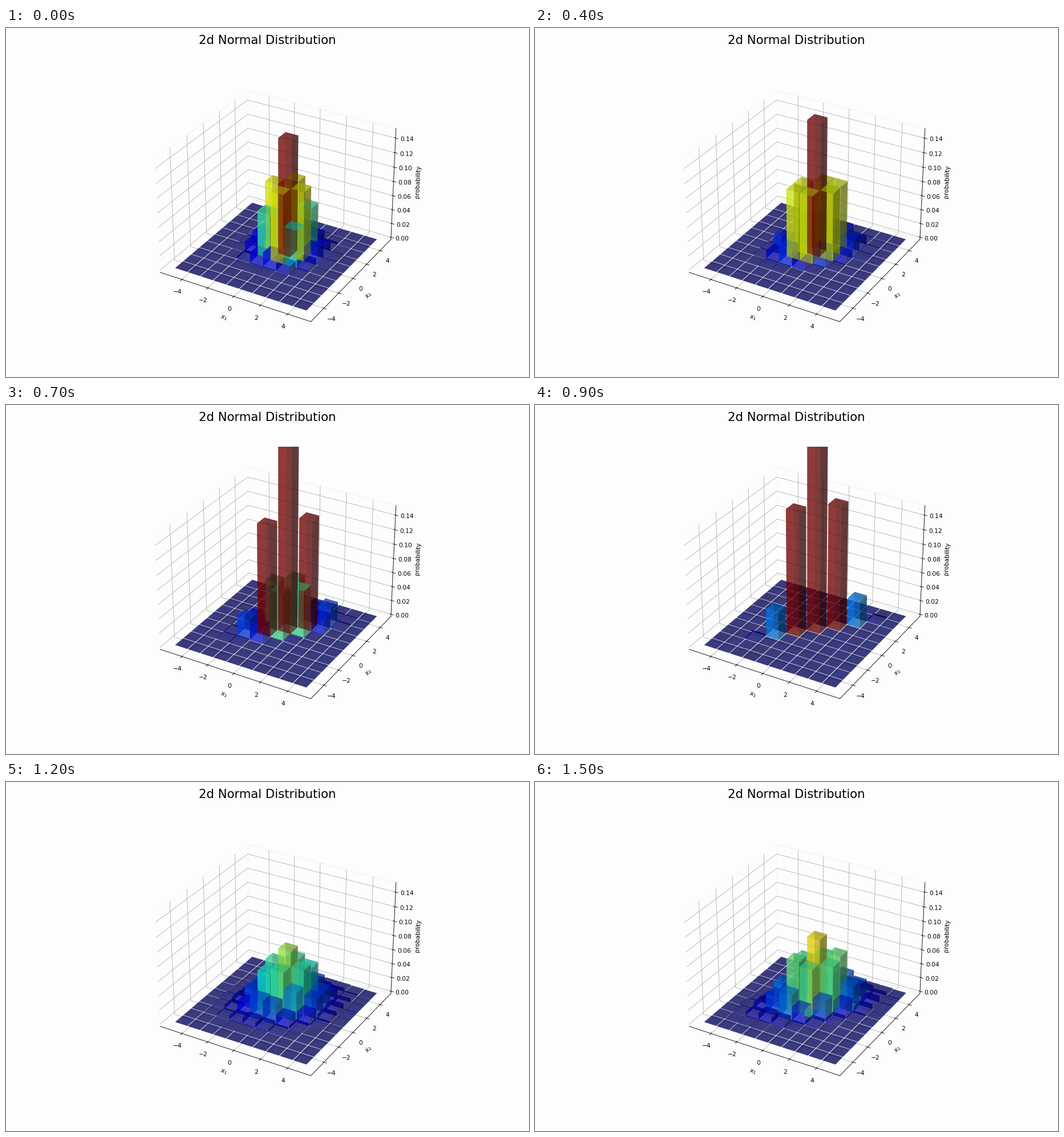
Recreate the animation shown at these times as a matplotlib script. Size 917 by 611 pixels, loop 1600 ms.

```python
import numpy as np
import matplotlib.pyplot as plt
from matplotlib.animation import FuncAnimation
from matplotlib.colors import Normalize

FRAMES, INTERVAL = 16, 100
DPI = 76.4
WIDTH, HEIGHT = 917.01, 611.01  # the fraction guards against rounding down
BAR = 0.95
Z_TOP = 0.15

plt.rcParams["font.family"] = "DejaVu Sans"

xs, ys = (g.ravel() for g in np.meshgrid(np.arange(-5, 5), np.arange(-5, 5)))
norm = Normalize(0, Z_TOP, clip=True)


def density(var, rho):
    """Bivariate normal density with equal variances and correlation rho."""
    if rho > 0.999:
        # Degenerate case: all mass lies on the diagonal.
        line = np.exp(-xs**2 / (2 * var)) / np.sqrt(4 * np.pi * var)
        return np.where(xs == ys, line, 0.0)
    rest = 1 - rho**2
    quad = (xs**2 - 2 * rho * xs * ys + ys**2) / (var * rest)
    return np.exp(-quad / 2) / (2 * np.pi * var * np.sqrt(rest))


def padded(low, high, share):
    pad = (high - low) * share
    return low - pad, high + pad


fig = plt.figure(figsize=(WIDTH / DPI, HEIGHT / DPI), dpi=DPI,
                 facecolor="#fdfdfd")
fig.suptitle("2d Normal Distribution", fontsize=20)

ax = fig.add_subplot(projection="3d", facecolor="#fdfdfd")
side = padded(*padded(-5, 4 + BAR, 0.05), 1 / 48)
ax.set_xlim(side)
ax.set_ylim(side)
ax.set_zlim(padded(0, Z_TOP, 1 / 48))
ax.set_xlabel("$x_1$")
ax.set_ylabel("$x_2$")
ax.set_zlabel("probability")
for axis in (ax.xaxis, ax.yaxis, ax.zaxis):
    axis.pane.fill = False

bars = []


def draw(i):
    while bars:
        bars.pop().remove()
    # Correlation climbs to one, then starts over with a wider spread.
    var, step = (1, i) if i < 10 else (2, i - 10)
    z = density(var, (step + 1) / 10)
    bars.append(ax.bar3d(xs, ys, np.zeros_like(z), BAR, BAR, z,
                         color=plt.cm.jet(norm(z)), alpha=0.52))
    return bars


anim = FuncAnimation(fig, draw, frames=FRAMES, interval=INTERVAL,
                     repeat=True, repeat_delay=0, blit=False)
plt.show()
```
